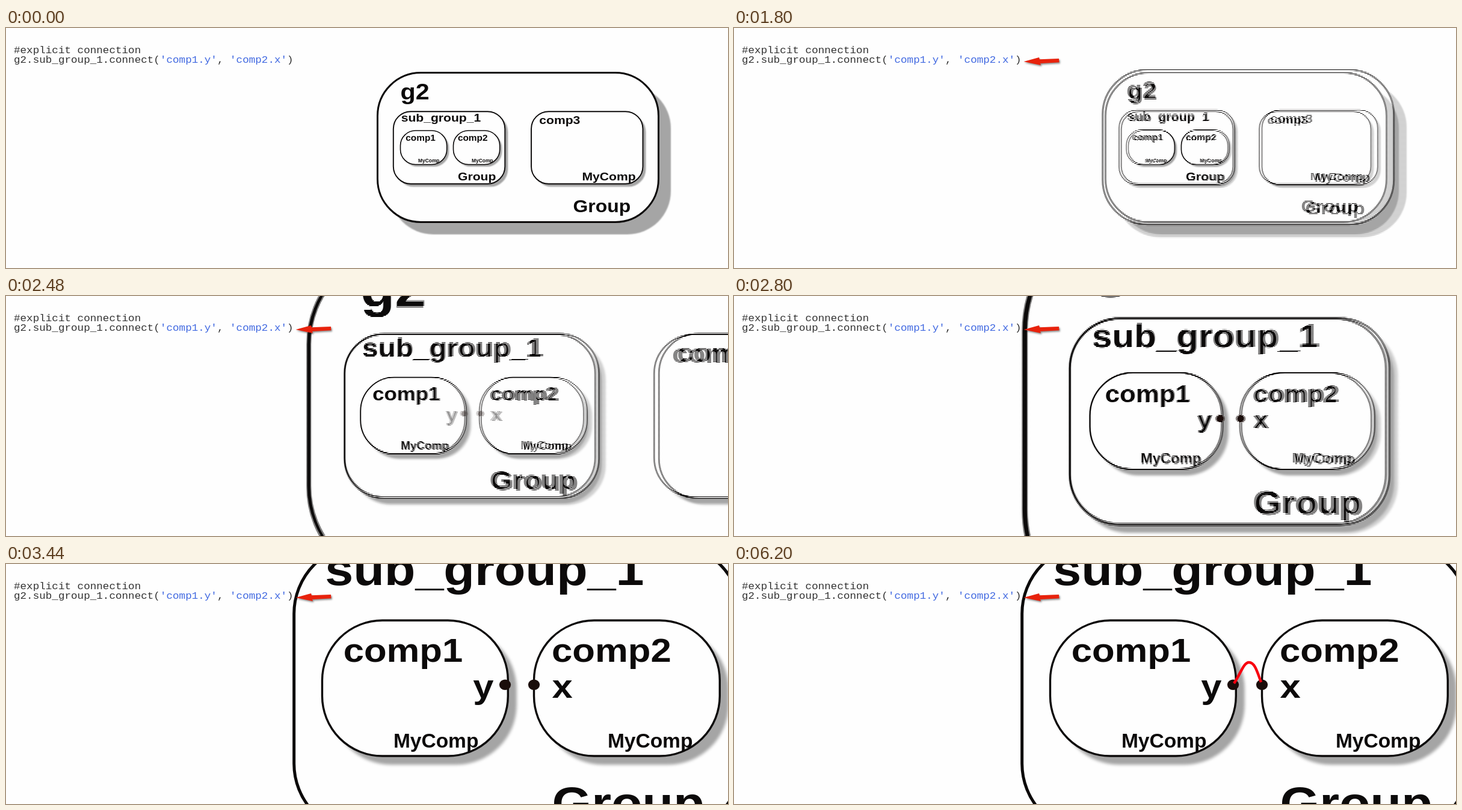
Animation, 1200 px wide and 400 px high, one loop 6.4 s. Source, as an HTML page with a canvas:

```html
<!DOCTYPE html>
<html lang="en">
<head>
<meta charset="utf-8">
<title>Explicit connection</title>
<style>
  html, body { margin: 0; width: 100%; height: 100%; overflow: hidden; background: #fefefe; }
  canvas { display: block; }
</style>
</head>
<body>
<canvas id="stage" width="1200" height="400"></canvas>
<script>
const ctx = document.getElementById('stage').getContext('2d');
const LOOP = 6400, STEP = 40, FIELD = 20;
const ZOOM_START = 1780, ZOOM_END = 3420;
const PANEL = 449; // left edge of the diagram's viewport
const PAPER = '#fefefe', INK = '#0c0a0a', BLUE = '#4169e1';
const WIDE = 1.1; // pixel aspect of the lettering

const ramp = (t, a, b) => Math.min(1, Math.max(0, (t - a) / (b - a)));

function text(str, x, y, size, wide = WIDE) {
  ctx.save();
  ctx.translate(x, y);
  ctx.scale(wide, 1);
  ctx.font = `bold ${size}px "Liberation Sans", Arial, sans-serif`;
  ctx.fillStyle = INK;
  ctx.fillText(str, 0, 0);
  ctx.restore();
}

function box(x, y, w, h, r, line, minLine, drop, zoom) {
  ctx.save();
  ctx.beginPath();
  ctx.roundRect(x, y, w, h, r);
  ctx.fillStyle = PAPER;
  ctx.shadowColor = '#a5a5a5';
  ctx.shadowOffsetX = ctx.shadowOffsetY = drop * zoom;
  ctx.shadowBlur = 1 + zoom;
  ctx.fill();
  ctx.shadowColor = 'transparent';
  ctx.lineWidth = Math.max(line, minLine / zoom);
  ctx.strokeStyle = INK;
  ctx.stroke();
  ctx.restore();
}

function dot(x, y) {
  ctx.beginPath();
  ctx.ellipse(x, y, 2.4, 2.2, 0, 0, 7);
  ctx.fillStyle = '#1a0d0a';
  ctx.fill();
}

function diagram(t) {
  const u = ramp(t, ZOOM_START, ZOOM_END);
  const zoom = 1 + 3 * u;
  const pan = u - 0.24 * Math.sin(2 * Math.PI * u);
  ctx.save();
  ctx.beginPath();
  ctx.rect(PANEL, 0, 1200 - PANEL, 400);
  ctx.clip();
  ctx.fillStyle = PAPER;
  ctx.fillRect(PANEL, 0, 1200 - PANEL, 400);
  ctx.translate(732.5 + 101 * pan, 206 + 28 * pan);
  ctx.scale(zoom, zoom);
  ctx.translate(-732.5, -206);

  box(617.5, 74.5, 467, 249, 72, 3, 3, 20.5, zoom);
  text('g2', 655.5, 119, 37.5);
  text('Group', 942.5, 307, 29);

  box(873, 139.2, 185.5, 120.5, 29, 1.25, 1.9, 4.9, zoom);
  text('comp3', 886.3, 160, 19.2);
  text('MyComp', 957.5, 254, 19.2);

  box(643.8, 139.2, 185.5, 120.5, 29, 1.25, 1.9, 4.9, zoom);
  text('sub_group_1', 656.7, 156.2, 19.2);
  text('Group', 751, 253.7, 19.2);

  for (const [x, name, nameX, kindX] of [[655.5, 'comp1', 664.3, 685.1], [743.5, 'comp2', 750.9, 774.1]]) {
    box(x, 171, 77.2, 56.5, 25, 0.85, 1.6, 3.6, zoom);
    text(name, nameX, 188.2, 14);
    text('MyComp', kindX, 224, 8.4, 1);
  }

  ctx.globalAlpha = ramp(t, 2400, 2560);
  text('y', 718.2, 203.3, 14);
  text('x', 751, 203.3, 14);
  dot(731.5, 197.8);
  dot(743.5, 197.8);
  ctx.restore();
}

function code() {
  const advance = 16 * 0.6;
  ctx.save();
  ctx.translate(13, 0);
  ctx.scale(WIDE, 1);
  ctx.font = '16px "Liberation Mono", "Courier New", monospace';
  const put = (str, col, y, color = '#333') => {
    ctx.fillStyle = color;
    ctx.fillText(str, col * advance, y);
  };
  put('#explicit connection', 0, 42);
  put('g2.sub_group_1.connect(', 0, 58);
  put("'comp1.y'", 23, 58, BLUE);
  put(',', 32, 58);
  put("'comp2.x'", 34, 58, BLUE);
  put(')', 43, 58);
  ctx.restore();
}

function arrow() {
  ctx.save();
  ctx.shadowColor = 'rgba(0,0,0,.45)';
  ctx.shadowOffsetX = 1.5;
  ctx.shadowOffsetY = 2;
  ctx.shadowBlur = 3;
  ctx.fillStyle = '#e8220c';
  ctx.fill(new Path2D('M481.5 56L507 49 508 52.3 540 51 540.5 57.3 509 59 510 62Z'));
  ctx.restore();
}

function wire(t) {
  ctx.save();
  ctx.beginPath();
  ctx.rect(826, 150, 54 * ramp(t, 4200, 4720), 60);
  ctx.clip();
  ctx.strokeStyle = '#f8000f';
  ctx.lineWidth = 4.4;
  ctx.stroke(new Path2D('M831 199C843 181 847 164 856 164C866 164 870 181 876 197'));
  ctx.restore();
}

// The zoom is interlaced: alternate rows show the moment one field earlier.
function earlierField(t) {
  ctx.save();
  ctx.beginPath();
  for (let y = 0; y < 400; y += 2) ctx.rect(0, y, 1200, 1);
  ctx.clip();
  diagram(t - FIELD);
  ctx.restore();
}

const start = performance.now();

function frame() {
  const t = Math.floor((performance.now() - start) % LOOP / STEP) * STEP;
  ctx.fillStyle = PAPER;
  ctx.fillRect(0, 0, 1200, 400);
  diagram(t);
  if (t > ZOOM_START && t < ZOOM_END) earlierField(t);
  code();
  if (t >= 480) arrow();
  if (t >= 4240) wire(t);
  requestAnimationFrame(frame);
}
frame();
</script>
</body>
</html>
```
